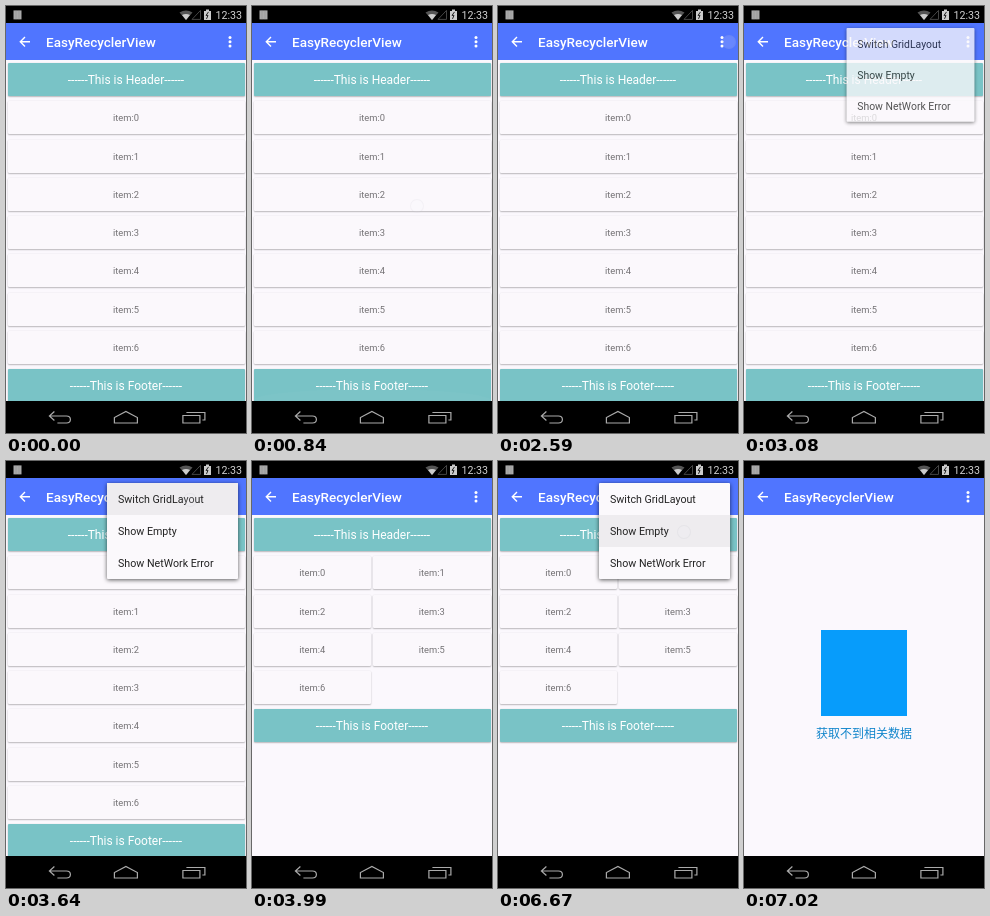
Recreate the animation shown at these times as an HTML page. Size 240 by 427 pixels, loop 8090 ms.

```html
<!DOCTYPE html>
<html lang="en">
<head>
<meta charset="utf-8">
<style>
html, body { margin: 0; width: 100%; height: 100%; overflow: hidden; }
body { position: relative; background: #fbf8fd; font-family: Roboto, "Noto Sans", sans-serif; }
div, svg { position: absolute; box-sizing: border-box; white-space: pre; }
#list, #empty { left: 0; top: 0; width: 240px; height: 427px; }
.card { height: 33px; line-height: 34px; text-align: center; font-size: 9.33px; color: #747275;
  background: #fbf8fc; border-radius: 1px; box-shadow: 0 .7px 1.6px rgba(0,0,0,.32); }
.band { background: #79c3c6; color: #fff; font-size: 12px; }
#glow { left: 0; width: 240px; height: 24px; border-radius: 50%; background: #fff; }
#bar { left: 0; top: 17px; width: 240px; height: 37px; background: #5075ff; }
#title { left: 40px; top: 17px; line-height: 38px; font-size: 13.5px; font-weight: 500; color: #fff; }
.black { left: 0; width: 240px; background: #000; }
#clock { right: 4px; top: 0; line-height: 19px; font-size: 10.67px; color: #d0d0d0; }
#menu { left: 101px; top: 22px; width: 131px; height: 96px; background: #fbf9fc;
  border-radius: 1px; transform-origin: 50% 0; box-shadow: 0 1px 4px rgba(0,0,0,.65); }
.row { left: 0; width: 100%; height: 32px; line-height: 34px; padding-left: 11px; font-size: 10.67px; color: #222; }
#dot { width: 14px; height: 14px; margin: -7px; border-radius: 50%;
  background: rgba(240,240,245,.15); border: 1px solid rgba(110,110,130,.07); }
#logo { left: 77px; top: 169px; width: 86px; height: 86px; background: #079cfb; }
#note { left: 0; width: 240px; top: 262px; line-height: 20px; text-align: center; font-size: 12px;
  font-weight: 500; color: #1185cb; font-family: "Noto Sans CJK SC", "Noto Sans CJK", sans-serif; }
</style>
</head>
<body>
<div id="list"></div>
<div id="empty"><div id="logo"></div><div id="note" lang="zh-CN">获取不到相关数据</div></div>
<div id="glow"></div>
<div id="bar"></div>
<div id="title">EasyRecyclerView</div>
<svg style="left:0;top:0" width="240" height="54" fill="#fff">
  <path d="M24 35.700h-9.500M19 31l-4.700 4.700 4.700 4.700" fill="none" stroke="#fff" stroke-width="1.400"/>
  <circle cx="224" cy="31.500" r="1.500"/><circle cx="224" cy="35.700" r="1.500"/><circle cx="224" cy="39.900" r="1.500"/>
</svg>
<div id="menu"></div>
<div class="black" style="top:0;height:17px"></div>
<div class="black" style="top:395px;height:32px"></div>
<div id="clock">12:33</div>
<svg style="left:0;top:0" width="240" height="427" fill="none">
  <g transform="translate(-.5 .4)">
    <path d="M8 4h8v9h-8z" fill="#aaa"/>
    <path d="M10.500 4v9M13.500 4v9" stroke="#888" stroke-width=".4"/>
    <path d="M174 6q6.500-4 13 0l-6.500 7.500z" fill="#555"/>
    <path d="M176.500 8.700q4-2.200 8 0l-4 4.800z" fill="#ccc"/>
    <path d="M186.500 13h8.500v-9z" stroke="#444"/>
    <path d="M198.500 4.500h2v-1.500h3v1.500h2v9h-7z" fill="#ccc"/>
    <path d="M203 5.500l-2.500 3.500h2l-1.500 3.500" stroke="#222"/>
  </g>
  <g stroke="#aaa" stroke-width="1.200" transform="translate(.4 0)">
    <path d="M48 405.500l-5 4.500 5 4.500M43.500 410h16.500q4 0 4 3.500t-4 3.500h-9"/>
    <path d="M108 417v-5.500l11.500-6 11.500 6v5.500z"/>
    <path d="M176.500 409.500h17v7.500h-17zM180 406.500h18.500v7.500h-2.500"/>
  </g>
</svg>
<div id="dot"></div>
<script>
const $ = id => document.getElementById(id);
const LOOP = 8090, STEP = 70, HOLD_END = 4990;
const clamp = v => Math.max(0, Math.min(1, v));
const pulse = (t, a, b, fade) => clamp((t - a) / fade) * clamp((b - t) / fade);

function add(parent, cls, text) {
  const el = document.createElement('div');
  el.className = cls;
  el.textContent = text;
  return $(parent).appendChild(el);
}

const header = add('list', 'card band', '------This is Header------');
const items = Array.from({ length: 7 }, (_, i) => add('list', 'card', 'item:' + i));
const footer = add('list', 'card band', '------This is Footer------');
const rows = ['Switch GridLayout', 'Show Empty', 'Show NetWork Error'].map((s, i) => {
  const el = add('menu', 'row', s);
  el.style.top = 32 * i + 'px';
  return el;
});

function place(el, row, col, cols) {
  const w = cols > 1 ? 117.5 : 237;
  Object.assign(el.style, { left: 1.5 + col * 119.5 + 'px', top: 57.2 + 38.25 * row + 'px', width: w + 'px' });
}

function layout(cols) {
  place(header, 0, 0, 1);
  items.forEach((el, i) => place(el, 1 + Math.floor(i / cols), i % cols, cols));
  place(footer, 1 + Math.ceil(items.length / cols), 0, 1);
}

// Each visit: tap the overflow button, popup grows in, a row is tapped, popup fades.
const visits = [
  { tap: 2590, open: 2966, pick: 3430, row: 0, x: 184, y: 39 },
  { tap: 4990, open: 5407, pick: 6460, row: 1, x: 186, y: 71 }
];

function showDot(x, y, alpha) {
  Object.assign($('dot').style, { left: x + 'px', top: y + 'px', opacity: alpha });
}

function drawMenu(t) {
  const v = visits[t < HOLD_END ? 0 : 1], close = v.pick + 350;
  const grow = 1 - (1 - clamp((t - v.open) / 220)) ** 2;
  const alpha = grow * (1 - clamp((t - close) / 180));
  $('menu').style.opacity = alpha;
  $('menu').style.transform = `scale(${0.9 + 0.1 * grow})`;
  rows.forEach((el, i) => el.style.background = i === v.row && t >= v.pick + 140 ? '#eeecef' : 'none');
  if (t >= v.pick) showDot(v.x, v.y, t < v.pick + 280 ? 1 : 0);
  else if (t >= v.tap) showDot(231, 36, pulse(t, v.tap - 70, v.open + 100, 70));
}

function drawDrag(t) {
  const up = t < 875;
  const y = up ? 300 - 100 * clamp((t - 70) / 770) : 200 + 97 * clamp((t - 910) / 700);
  showDot(165, y, t >= 70 && t < 1680 ? 0.7 : 0);
  $('glow').style.top = up ? '383px' : '42px';
  $('glow').style.opacity = 0.12 * (up ? pulse(t, 210, 875, 200) : pulse(t, 1050, 2170, 400));
}

function frame(now) {
  const ms = now % LOOP, base = ms < HOLD_END ? 0 : HOLD_END;
  const t = base + Math.floor((ms - base) / STEP) * STEP;
  const empty = t >= visits[1].pick + 350;
  layout(t < visits[0].pick + 350 ? 1 : 2);
  $('list').style.visibility = empty ? 'hidden' : 'visible';
  $('empty').style.visibility = empty ? 'visible' : 'hidden';
  drawDrag(t);
  drawMenu(t);
  requestAnimationFrame(frame);
}
frame(performance.now());
</script>
</body>
</html>
```
